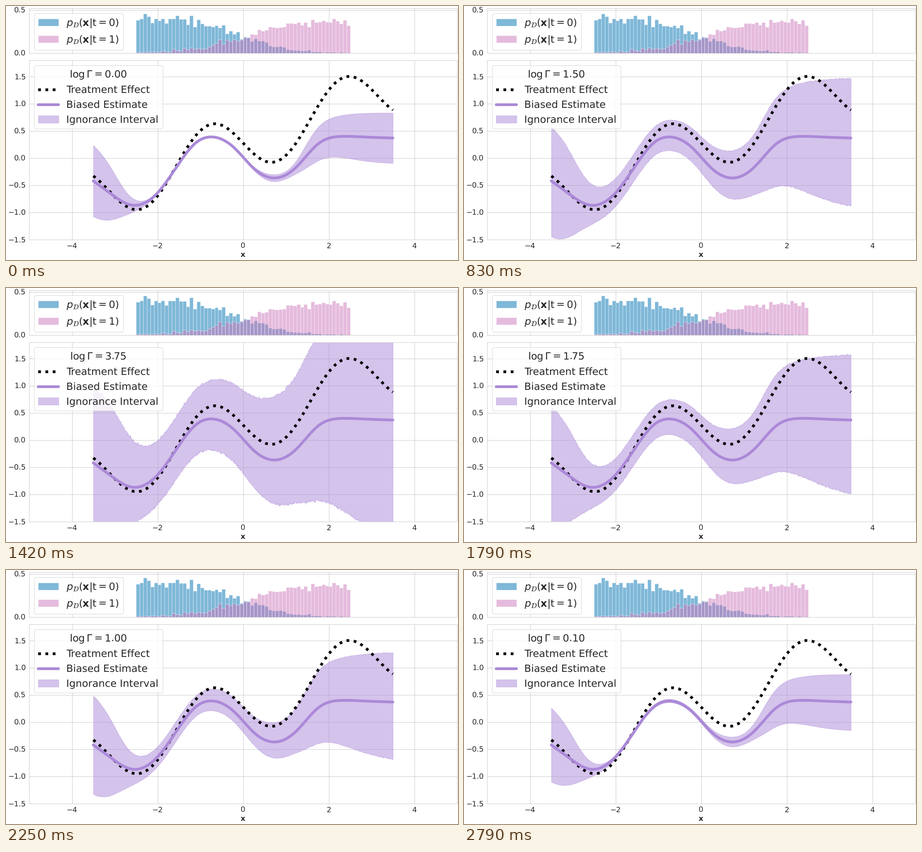
A matplotlib script for the animation above (2.83 s loop, 998 px wide and 561 px high).

```python
import numpy as np
import matplotlib.pyplot as plt
from matplotlib.animation import FuncAnimation

W, H, DPI = 998, 561, 64
PX = 72 / DPI  # points per pixel
LOOP_MS, FRAMES = 2830, 100
STEP_MS = 1000 / 24  # pace at which log gamma changes

BLUE, PINK, PURPLE = "#0173b2", "#cc78bc", "#ab89d8"
INK, GRID = "#262626", "#cccccc"
SMALL, LARGE = 16.3 * PX, 22.25 * PX

plt.rcParams.update({
    "font.family": "DejaVu Sans",
    "mathtext.fontset": "dejavusans",
    "text.hinting": "none",
    "text.color": INK,
    "axes.labelcolor": INK,
    "xtick.color": INK,
    "ytick.color": INK,
    "axes.edgecolor": GRID,
    "axes.linewidth": PX,
    "axes.axisbelow": True,
    "grid.color": GRID,
    "grid.linewidth": PX,
    "lines.solid_capstyle": "round",
    "patch.linewidth": PX,
    "legend.fontsize": LARGE,
    "legend.title_fontsize": LARGE,
    "legend.edgecolor": GRID,
    "legend.framealpha": 0.8,
})


def rise(x, height, rate, centre):
    """Logistic step; a negative rate makes it fall."""
    return height / (1 + np.exp(-rate * (x - centre)))


def bump(x, height, centre, width):
    return height * np.exp(-((x - centre) / width) ** 2)


def spline(points, x):
    """Natural cubic spline through the points, evaluated at x."""
    xs, ys = np.array(points).T
    h, n = np.diff(xs), len(xs)
    slope = np.diff(ys) / h
    a, rhs = np.eye(n), np.zeros(n)
    for i in range(1, n - 1):
        a[i, i - 1:i + 2] = h[i - 1], 2 * (h[i - 1] + h[i]), h[i]
        rhs[i] = 6 * (slope[i] - slope[i - 1])
    m = np.linalg.solve(a, rhs)
    k = np.clip(np.searchsorted(xs, x) - 1, 0, n - 2)
    l, r, d = xs[k + 1] - x, x - xs[k], h[k]
    return ((m[k] * l**3 + m[k + 1] * r**3) / (6 * d)
            + (ys[k] / d - m[k] * d / 6) * l
            + (ys[k + 1] / d - m[k + 1] * d / 6) * r)


x = np.linspace(-3.5, 3.5, 701)
effect = 0.1387 * (2 + 2 * x - 4 * np.sin(2 * x))
mean = spline([(-3.5, -.42), (-3.1, -.65), (-2.63, -.86), (-2, -.64),
               (-1.5, -.10), (-1.1, .285), (-.73, .39), (-.2, .185),
               (.25, -.19), (.76, -.365), (1.25, -.16), (1.75, .26),
               (2.3, .40), (2.8, .39), (3.5, .37)], x)

# Half width at log gamma 0: grows away from the data
spread = (0.012 + rise(x, .69, -4.6, -2.93) + bump(x, .045, .65, .45)
          + rise(x, .32, 5.5, 1.4) + rise(x, .135, 3, 2.4))

# Extra width above and below at log gamma 1 and 3.75
up_low = .14 + rise(x, .35, .8, 1) + bump(x, .10, -3.5, .6)
up_high = .53 + rise(x, .99, 1.3, .45) + bump(x, .27, -3, .75)
down_low = .15 + rise(x, .53, 1.2, 2.2) + bump(x, .10, -3.5, .6)
down_high = .51 + rise(x, 1.4, 1.2, 2.1) + bump(x, .40, -3.5, .6)


def log_gamma(ms):
    """Stepped climb to 3.75, pause, fall to 1, pause, fall towards 0."""
    step = ms // STEP_MS
    return np.interp(step, [0, 10, 20, 29, 35, 44, 49, 55, 61, 67],
                     [0, .5, 1.5, 3.75, 3.75, 1.5, 1, 1, .4, .1])


def band(g):
    """Outline of the interval at log gamma g."""
    near, far = min(g, 1), max(g - 1, 0) / 2.75
    rng = np.random.default_rng(int(round(g * 100)))
    rough = 0.0032 * g * (1 + 0.4 * np.clip(x - 1.5, 0, 2))
    noise = rng.normal(size=(2, x.size)) * rough
    top = mean + spread + up_low * near + (up_high - up_low) * far + noise[0]
    low = mean - spread - down_low * near - (down_high - down_low) * far + noise[1]
    return np.column_stack([np.r_[x, x[::-1]], np.r_[top, low[::-1]]])


fig = plt.figure(figsize=(W / DPI, H / DPI), dpi=DPI, facecolor="white")


def panel(top, bottom, ylim):
    ax = fig.add_axes([51 / W, 1 - bottom / H, 945 / W, (bottom - top) / H])
    ax.set(xlim=(-5, 5), ylim=ylim, xticks=[-4, -2, 0, 2, 4])
    ax.grid(True)
    ax.tick_params(length=0, pad=7 * PX, labelsize=SMALL)
    return ax


hist = panel(5, 104, (0, 0.521))
hist.set_yticks([0, 0.5])
hist.tick_params(labelbottom=False)
bins = 60
mids = (np.arange(bins) + 0.5) * 5 / bins - 2.5
rng = np.random.default_rng(4)
groups = [(rise(mids, .41, -1.85, 0), BLUE), (rise(mids, .38, 1.55, 0), PINK)]
for t, (density, color) in enumerate(groups):
    heights = density + 0.05 * np.sqrt(density) * rng.normal(size=bins)
    hist.bar(mids, np.clip(heights, 0, 0.496), width=5 / bins,
             color=color, edgecolor="white", linewidth=PX, alpha=0.5,
             label=rf"$p_\mathcal{{D}}(\mathbf{{x}}|\mathrm{{t}}={t})$")
hist.legend(loc="upper left")

main = panel(120, 516, (-1.5, 1.8))
main.set_yticks(np.arange(-1.5, 1.6, 0.5))
main.set_xlabel(r"$\mathbf{x}$", fontsize=SMALL, va="center")
main.xaxis.set_label_coords(0.5, -34 / 396)
main.plot(x, effect, ":", color="black", lw=6.07 * PX, zorder=3,
          label="Treatment Effect")
main.plot(x, mean, color=PURPLE, lw=6.07 * PX, zorder=4, label="Biased Estimate")
interval = main.fill_between(x, mean - spread, mean + spread, color=PURPLE,
                             alpha=0.5, lw=PX, zorder=2,
                             label="Ignorance Interval")
legend = main.legend(loc="upper left", title=r"$\log\Gamma = 0.00$")
legend.set_zorder(6)


def draw(i):
    # Read the pace near the middle of each drawn frame
    g = log_gamma((i + 0.5) * LOOP_MS / FRAMES + 5)
    interval.set_verts([band(g)])
    legend.get_title().set_text(rf"$\log\Gamma = {g:.2f}$")
    return interval, legend


anim = FuncAnimation(fig, draw, frames=FRAMES, interval=LOOP_MS / FRAMES,
                     repeat=True, repeat_delay=0, blit=False)
plt.show()
```
